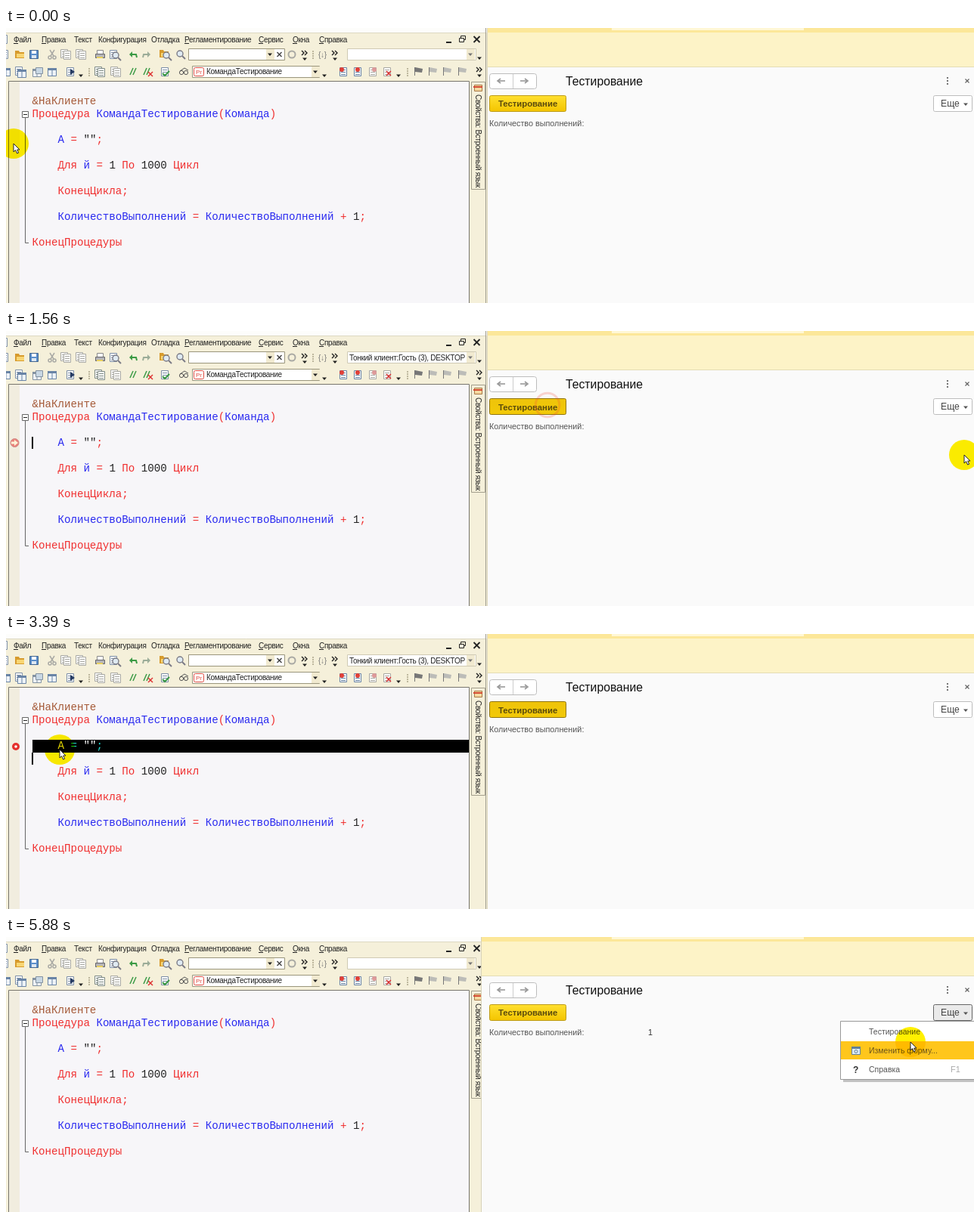
Recreate the animation shown at these times as an HTML page with a canvas. Size 1280 by 364 pixels, loop 5.94 s.

```html
<!DOCTYPE html>
<html lang="ru">
<head>
<meta charset="utf-8">
<style>
html, body { margin: 0; width: 100%; height: 100%; overflow: hidden; }
canvas { display: block; }
</style>
</head>
<body>
<canvas id="stage" width="1280" height="364"></canvas>
<script>
const ctx = document.getElementById('stage').getContext('2d');
const LOOP = 5940, STEP = 30;
const SANS = '"Liberation Sans", Arial, sans-serif';
const SMALL = '10px ' + SANS, MONO = '14.15px "Liberation Mono", monospace';
const CREAM = '#f5f0da', RED = '#f03030', BLUE = '#2a2af0', DARK = '#222', GREY = '#a9a9a4';
const CHAR = 8.49, CODE_X = 34.5;

// Moments when the state changes
const SET_BREAK = 240, CARET = 600, STOP = 1320, SELECT = 3060, DESELECT = 3690,
  RESUME = 4530, RELEASE = 5100, MENU = 5490;

const path = [
  [0, 10, 153], [300, 10, 153], [630, 128, 165], [720, 420, 205], [810, 700, 175],
  [840, 760, 160], [900, 835, 130], [990, 737, 104], [1200, 735, 104], [1290, 716, 98],
  [1320, 740, 110], [1400, 938, 192], [1440, 1085, 243], [1470, 1165, 253], [1500, 1205, 237],
  [1530, 1240, 212], [1560, 1267, 164], [1680, 1246, 102], [2190, 1246, 102], [2250, 1186, 133],
  [2310, 866, 179], [2460, 690, 175], [2850, 14, 150], [3090, 14, 150], [3360, 71, 153],
  [3660, 71, 153], [4170, 228, 172], [4770, 228, 172], [5040, 700, 190], [5340, 1231, 100],
  [5430, 1250, 100], [5520, 1250, 100], [5670, 1240, 151], [5820, 1240, 151], [5880, 1196, 139]
];
const clicks = [[150, 10, 153], [1290, 716, 98], [2190, 1246, 102], [5460, 1250, 100]];

function pointerAt(t) {
  const i = path.findIndex(p => p[0] > t);
  if (i < 0) return path[path.length - 1].slice(1);
  const [t0, x0, y0] = path[i - 1], [t1, x1, y1] = path[i];
  const k = (t - t0) / (t1 - t0);
  return [x0 + (x1 - x0) * k, y0 + (y1 - y0) * k];
}

function box(x, y, w, h, fill, stroke, radius = 0) {
  ctx.beginPath();
  ctx.roundRect(stroke ? x + .5 : x, stroke ? y + .5 : y, w, h, radius);
  if (fill) { ctx.fillStyle = fill; ctx.fill(); }
  if (stroke) { ctx.strokeStyle = stroke; ctx.lineWidth = 1; ctx.stroke(); }
}
function text(s, x, y, font = SMALL, color = DARK) {
  ctx.font = font;
  ctx.letterSpacing = font === SMALL ? '-0.3px' : '0px';
  ctx.fillStyle = color;
  ctx.fillText(s, x, y);
}
function line(color, width, ...pts) {
  ctx.beginPath();
  for (let i = 0; i < pts.length; i += 2) ctx.lineTo(pts[i], pts[i + 1]);
  ctx.strokeStyle = color;
  ctx.lineWidth = width;
  ctx.stroke();
}
function poly(color, ...pts) {
  ctx.beginPath();
  for (let i = 0; i < pts.length; i += 2) ctx.lineTo(pts[i], pts[i + 1]);
  ctx.fillStyle = color;
  ctx.fill();
}
function circle(x, y, r, fill, stroke, width = 1) {
  ctx.beginPath();
  ctx.arc(x, y, r, 0, 7);
  if (fill) { ctx.fillStyle = fill; ctx.fill(); }
  if (stroke) { ctx.strokeStyle = stroke; ctx.lineWidth = width; ctx.stroke(); }
}
const drop = (x, y, c = DARK) => poly(c, x - 3, y - 1.5, x + 3, y - 1.5, x, y + 2);
function cross(x, y, r, color, width = 1.5) {
  line(color, width, x - r, y - r, x + r, y + r);
  line(color, width, x - r, y + r, x + r, y - r);
}

// Toolbar icons, centred on x, y
const icon = {
  doc(x, y, c = '#7d8fa8') {
    box(x - 5, y - 6, 9, 11, '#fcfcfa', c);
    for (let i = -3; i < 4; i += 3) line(c, 1, x - 3, y + i + .5, x + 3, y + i + .5);
  },
  pages(x, y, c) { icon.doc(x - 2, y - 1, c); icon.doc(x + 2, y + 1, c); },
  folder(x, y) { poly('#d79b2d', x - 6, y - 5, x - 1, y - 5, x, y - 3, x + 6, y - 3, x + 6, y + 5, x - 6, y + 5); box(x - 4, y - 1, 10, 5, '#f8d673'); },
  save(x, y) { box(x - 6, y - 6, 11, 11, '#5c8fcb', '#41658f'); box(x - 3, y - 5, 6, 4, '#fff'); box(x - 3, y + 1, 6, 4, '#dde8f2'); },
  cut(x, y) { line(GREY, 1.5, x - 3, y - 6, x + 2, y + 2); line(GREY, 1.5, x + 3, y - 6, x - 2, y + 2); circle(x - 3, y + 4, 2, null, GREY, 1.5); circle(x + 3, y + 4, 2, null, GREY, 1.5); },
  print(x, y) { box(x - 4, y - 6, 8, 5, '#fff', '#888'); box(x - 6, y - 1, 12, 5, '#b5b5b8', '#66666c'); box(x - 4, y + 3, 8, 2, '#e8d060'); },
  lens(x, y, c = '#7b7b86') { circle(x - 1, y - 1, 4, '#dfeaf2', c, 1.4); line(c, 2, x + 2, y + 2, x + 6, y + 6); },
  turn(x, y, dir, c) { line(c, 2, x + 5 * dir, y + 4, x + 4 * dir, y, x - 2 * dir, y); poly(c, x - 5 * dir, y, x - dir, y - 4, x - dir, y + 4); },
  more(x, y) { for (const d of [0, 4]) line(DARK, 1.4, x - 4 + d, y - 6, x - 1 + d, y - 3, x - 4 + d, y); drop(x, y + 5); },
  table(x, y, c = '#6984a6') { box(x - 6, y - 5, 11, 10, '#eef3f7', c); box(x - 6, y - 5, 12, 3, c); line(c, 1, x, y - 2, x, y + 5); },
  data(x, y) { icon.table(x - 1, y + 1, '#8493a2'); box(x - 3, y - 6, 9, 8, '#c8d7e3', '#8493a2'); },
  slashes(x, y, c) { line(c, 1.5, x - 4, y + 4, x, y - 5); line(c, 1.5, x, y + 4, x + 4, y - 5); },
  flag(x, y, c) { line('#777', 1, x - 4.5, y - 5, x - 4.5, y + 6); poly(c, x - 4, y - 5, x + 6, y - 3, x + 5, y + 2, x - 4, y + 1); }
};
const grip = (x, y) => { for (let i = -5; i < 6; i += 3) box(x, y + i, 2, 2, '#bdb79d'); };
function combo(x, y, w, arrow, gray) {
  box(x, y, w, 15, '#fff', gray ? '#cfcab4' : '#9b967d');
  box(arrow - 5, y + 1, 11, 14, '#f1ead0');
  drop(arrow, y + 8, gray ? '#777' : DARK);
}

function toolbars(t) {
  box(0, 0, 636, 364, CREAM);
  box(0, 0, 636, 6, '#fdfdfb');
  line('#ddd8c2', 1, 0, 6.5, 635, 6.5);
  const menu = [['Файл', 10], ['Правка', 47], ['Текст', 90], ['Конфигурация', 122], ['Отладка', 192],
    ['Регламентирование', 236], ['Сервис', 334], ['Окна', 379], ['Справка', 414]];
  for (const [s, x] of menu) {
    text(s, x, 19);
    if (!/^[ТК]|Отл/.test(s)) line(DARK, 1, x, 20.5, x + 6, 20.5);
  }
  icon.doc(-3, 15);
  line(DARK, 2, 582, 19, 589, 19);
  box(601, 10, 6, 5, null, DARK);
  box(599, 13, 6, 5, CREAM, DARK);
  cross(622.5, 15, 4, DARK, 1.8);

  icon.doc(-2, 35); icon.folder(18, 35); icon.save(37, 35); icon.cut(61, 35);
  icon.pages(79, 35, GREY); icon.pages(99, 35, GREY); icon.print(124, 35);
  icon.doc(142, 35); icon.lens(146, 37);
  icon.turn(168, 35, 1, '#3b9a45'); icon.turn(186, 35, -1, '#9bac98');
  icon.folder(209, 34); icon.lens(213, 37); icon.lens(231, 35);
  combo(241, 27, 127, 349); cross(361.5, 35, 3, '#444');
  circle(378, 35, 4.5, null, GREY, 2); icon.more(395, 36);
  text('{↓}', 413, 39, SMALL, '#777'); icon.more(435, 36);
  grip(405, 35);
  combo(451, 27, 170, 614, true); drop(626, 40);
  if (t >= STOP && t < RESUME) {
    ctx.save();
    ctx.beginPath(); ctx.rect(452, 28, 155, 15); ctx.clip();
    text('Тонкий клиент:Гость (3), DESKTOP', 454, 39);
    ctx.restore();
  }

  const selected = t >= SELECT && t < DESELECT;
  icon.table(0, 58); icon.doc(17, 57); icon.table(21, 60); icon.data(42, 58); icon.table(61, 58);
  icon.doc(85, 58); poly('#263b62', 85, 54, 91, 58, 85, 62); drop(99, 63);
  grip(109, 58);
  icon.pages(124, 58, selected ? GREY : '#7f8b86'); icon.pages(145, 58, GREY);
  icon.slashes(168, 58, '#3b9a45'); icon.slashes(186, 58, '#3b9a45'); cross(191, 61, 3, '#d33');
  icon.doc(210, 58); line('#3b9a45', 2, 207, 60, 210, 63, 216, 57);
  circle(232, 59, 2.6, null, '#555'); circle(238, 59, 2.6, null, '#555'); line('#555', 1, 230, 57, 236, 53, 241, 56);
  combo(246, 50, 168, 409);
  box(248, 52, 13, 11, '#fff', '#df4b40', 2); text('Pr', 251, 61, '8px ' + SANS, '#df4b40');
  text('КомандаТестирование', 265, 61); drop(421, 63);
  [446, 465, 485, 504].forEach((x, i) => {
    icon.doc(x, 58, i > 1 ? GREY : '#6984a6');
    if (i === 3) cross(x + 2, 60, 3, '#d33'); else circle(x - 2 + 2 * i, 55, 3, i === 2 ? '#d99' : '#e04038');
  });
  drop(519, 63); grip(530, 58);
  [545, 564, 583, 603].forEach((x, i) => icon.flag(x, 57, i ? '#bcbcb8' : '#777'));
  icon.more(626, 58);
}

function code(tokens, row, column = 0) {
  for (const [s, color] of tokens) {
    text(s, CODE_X + column * CHAR, 101 + row * 17, MONO, color);
    column += s.length;
  }
}

function editor(t) {
  box(3, 70, 610, 294, '#f7f6f9');
  box(4, 71, 14, 293, '#f1eddf');
  line('#77756c', 1, 3.5, 364, 3.5, 70.5, 612.5, 70.5, 612.5, 364);
  box(615, 71, 18, 142, CREAM, '#a39f8d');
  box(619, 75, 10, 8, '#f5d9a0', '#a97845'); line('#d34a33', 2, 618, 78, 630, 78);
  ctx.save();
  ctx.translate(621, 88); ctx.rotate(Math.PI / 2);
  text('Свойства: Встроенный язык', 0, 0);
  ctx.restore();
  line('#9d9a8e', 1, 634.5, 0, 634.5, 364);

  line('#666', 1, 25.5, 118, 25.5, 284.5, 30, 284.5);
  box(21, 110, 8, 8, '#fff', '#666'); line(DARK, 1, 23, 114.5, 28, 114.5);

  const selected = t >= SELECT && t < DESELECT;
  if (selected) box(35, 140, 577, 17, '#000');
  const [name, sign, quote] = selected ? ['#e0e020', '#20d8d0', '#fff'] : [BLUE, RED, DARK];
  code([['&НаКлиенте', '#a55a38']], 0);
  code([['Процедура ', RED], ['КомандаТестирование', BLUE], ['(', RED], ['Команда', BLUE], [')', RED]], 1);
  code([['А ', name], ['= ', sign], ['""', quote], [';', sign]], 3, 4);
  code([['Для ', RED], ['й ', BLUE], ['= ', RED], ['1 ', DARK], ['По ', RED], ['1000 ', DARK], ['Цикл', RED]], 5, 4);
  code([['КонецЦикла;', RED]], 7, 4);
  code([['КоличествоВыполнений ', BLUE], ['= ', RED], ['КоличествоВыполнений ', BLUE], ['+ ', RED], ['1', DARK], [';', RED]], 9, 4);
  code([['КонецПроцедуры', RED]], 11);

  if (t >= SET_BREAK && t < SELECT) {
    circle(11.5, 148, 5.5, '#e9827b', '#cf8b86');
    if (t >= STOP) poly('#fff3d8', 7, 146.5, 11, 146.5, 11, 144, 16, 148, 11, 152, 11, 149.5, 7, 149.5);
  } else if (t >= SELECT && t < RESUME) {
    circle(13, 149, 5, '#e5302c'); circle(13, 149, 1.8, '#fff');
  }

  const carets = [[CARET, 128, 140], [STOP, 34, 140], [SELECT, 34, 157], [DESELECT, 0, 0]];
  const caret = carets.filter(c => t >= c[0]).pop();
  if (caret && caret[1] && (t - caret[0]) % 1060 < 530) box(caret[1], caret[2], 2, 16, '#000');
}

function client(t) {
  const left = t >= RESUME ? 628 : 636;
  box(left, 0, 1280 - left, 364, '#fafafa');
  box(left, 0, 1280 - left, 52, '#fdf3c7');
  box(left, 0, 1280 - left, 6, '#fce799');
  box(801, 0, 254, 3, '#fff7d5');
  line('#e4dcb5', 1, left, 51.5, 1280, 51.5);
  line('#d8d2b8', 1, left + .5, 0, left + .5, 364);

  box(639, 60, 62, 20, '#fff', '#bdbdbd', 3);
  line('#ccc', 1, 670.5, 61, 670.5, 80);
  for (const [x, dir] of [[655, -1], [685, 1]]) {
    line('#999', 1.6, x - 5, 70, x + 5, 70);
    line('#999', 1.6, x + dir, 67, x + 5 * dir, 70, x + dir, 73);
  }
  text('Тестирование', 740, 76, '15.75px ' + SANS, '#111');
  for (const y of [66, 70, 74]) circle(1245, y, 1.1, '#555');
  cross(1271, 70, 2.5, '#666', 1.2);

  const pressed = t >= STOP && t < RELEASE;
  const shade = ctx.createLinearGradient(0, 89, 0, 110);
  shade.addColorStop(0, pressed ? '#eec30a' : '#ffe030');
  shade.addColorStop(1, pressed ? '#f2c908' : '#f4c500');
  box(639, 89, 101, 21, shade, pressed ? '#8f7410' : '#bd9b17', 2);
  text('Тестирование', 651, pressed ? 105 : 104, 'bold 11.3px ' + SANS, '#5a4a0c');

  const open = t >= MENU;
  box(1226, 89, 51, 21, open ? '#eaeaea' : '#fff', open ? '#666' : '#bdbdbd', 2);
  text('Еще', 1236, 104, '12.2px ' + SANS, '#444');
  drop(1269, 101, '#555');

  const label = '10.8px ' + SANS;
  text('Количество выполнений:', 639, 130, label, '#555');
  if (t >= RESUME) text('1', 849, 130, label, '#333');
  if (open) dropdown();
}

function dropdown() {
  const font = '10.5px ' + SANS;
  box(1107, 188, 173, 4, '#c2c2c2');
  box(1103, 111, 180, 77, '#fff', '#999');
  box(1104, 138, 176, 24, '#ffc61c');
  text('Тестирование', 1141, 128.5, font, '#555');
  text('Изменить форму...', 1141, 154, font, '#6a541c');
  text('Справка', 1141, 179, font, '#555');
  text('F1', 1249, 179, '11px ' + SANS, '#aaa');
  text('?', 1120, 180, 'bold 12px ' + SANS, '#333');
  box(1118, 145, 11, 10, '#dcebf4', '#637f98');
  box(1118, 145, 12, 3, '#637f98');
  circle(1124, 151.5, 2, null, '#637f98');
}

function pointer(t) {
  const [x, y] = pointerAt(t);
  ctx.globalCompositeOperation = 'multiply';
  circle(x, y, 20, '#fff000');
  ctx.globalCompositeOperation = 'source-over';
  for (const [start, cx, cy] of clicks) {
    const age = t - start;
    if (age < 0 || age > 350) continue;
    ctx.globalAlpha = .9 - age * .0025;
    circle(cx, cy, 5 + age * .04, null, '#f04a38', 3);
    ctx.globalAlpha = 1;
  }
  const selecting = t >= SELECT && t < DESELECT;
  if (x > 30 && x < 612 && y > 70 && !selecting) {
    line('#555', 1, x + .5, y - 6, x + .5, y + 6);
    for (const d of [-6, 6]) line('#555', 1, x - 2, y + d, x + 3, y + d);
    return;
  }
  ctx.save();
  ctx.translate(x, y);
  const arrow = [0, 0, 0, 11, 2.6, 8.6, 4.6, 13, 6.6, 12.2, 4.7, 8, 8, 8, 0, 0];
  poly('#fff', ...arrow);
  line('#222', 1, ...arrow);
  ctx.restore();
}

function draw(now) {
  const t = Math.floor(now % LOOP / STEP) * STEP;
  toolbars(t);
  editor(t);
  client(t);
  pointer(t);
  requestAnimationFrame(draw);
}
draw(0);
</script>
</body>
</html>
```
